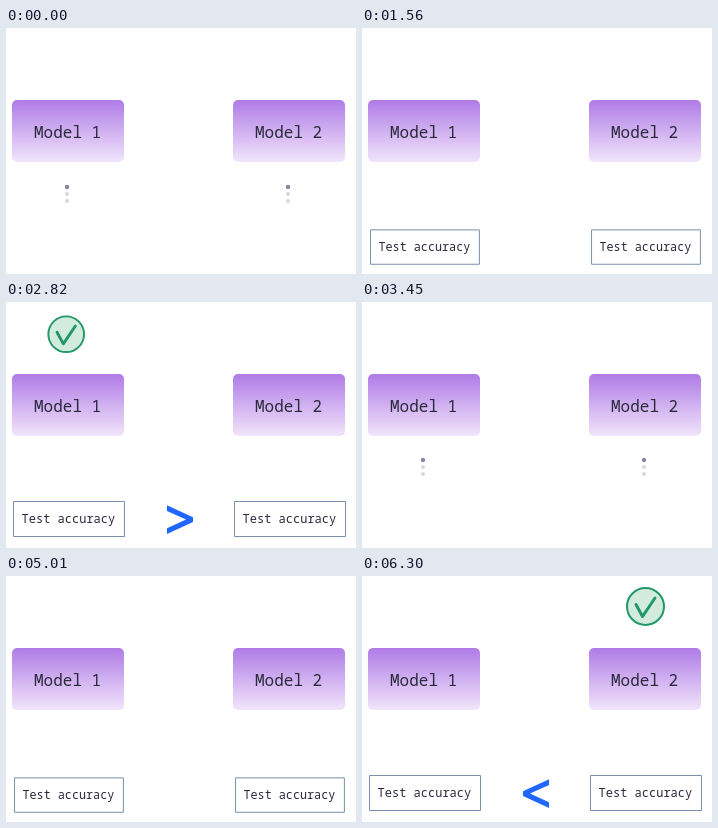
An HTML page with a canvas for the animation above (6.9 s loop, 350 by 246 pixels).

```html
<!DOCTYPE html>
<html lang="en">
<head>
<meta charset="utf-8">
<title>Model comparison</title>
<style>
html, body { margin: 0; width: 350px; height: 246px; overflow: hidden; background: #fff; }
canvas { display: block; }
</style>
</head>
<body>
<canvas id="stage" width="350" height="246"></canvas>
<script>
const ctx = document.getElementById('stage').getContext('2d');
const LOOP = 6900, HALF = LOOP / 2, STEP = 30, SPACING = 221;
const MONO = '"Noto Sans Mono", "DejaVu Sans Mono", monospace';

const fade = ctx.createLinearGradient(0, 72, 0, 134);
fade.addColorStop(0, '#b07be6');
fade.addColorStop(1, '#f1e5fb');

const clamp = x => Math.max(0, Math.min(1, x));
const lerp = (a, b, p) => a + (b - a) * p;
const progress = (t, start, end) => clamp((t - start) / (end - start));
const easeOut = p => 1 - (1 - p) ** 2;
const backOut = (p, c) => 1 + (c + 1) * (p - 1) ** 3 + c * (p - 1) ** 2;

function label(text, x, y, size, color) {
  ctx.font = `${size}px ${MONO}`;
  ctx.textAlign = 'center';
  ctx.fillStyle = color;
  ctx.fillText(text, x, y);
}

function model(n) {
  ctx.fillStyle = fade;
  ctx.beginPath();
  ctx.roundRect(6, 72, 112, 62, 5);
  ctx.fill();
  label('Model ' + n, 61.6, 109.5, 16, '#2b2a3d');
}

function dots(t, top) {
  const active = Math.floor(t / 240) % 3;
  for (let i = 0; i < 3; i++) {
    ctx.fillStyle = i === active ? '#838a9f' : '#d5d8e0';
    ctx.beginPath();
    ctx.arc(61, top + i * 7, i === active ? 2.2 : 2, 0, 7);
    ctx.fill();
  }
}

function accuracyBox(p) {
  const grow = easeOut(p);
  const w = lerp(4, 111, grow), h = lerp(4, 35, grow);
  const x = lerp(61.5, 63, grow), y = lerp(181.5, 217, backOut(p, 3.5));
  ctx.fillStyle = '#fff';
  ctx.strokeStyle = '#7890ab';
  ctx.lineWidth = 1;
  ctx.beginPath();
  ctx.rect(x - w / 2, y - h / 2, w, h);
  ctx.fill();
  ctx.stroke();
  if (w < 8) return;
  ctx.save();
  ctx.translate(x, y);
  ctx.scale(w / 111, w / 111);
  label('Test accuracy', -0.6, 4, 12, '#2b2a3d');
  ctx.restore();
}

// A "<" that flips around its tilted vertical axis; dir -1 mirrors it to ">".
function chevron(p, dir) {
  const angle = Math.PI * (1 - p * p);
  ctx.save();
  ctx.translate(174, 217.6);
  ctx.scale(dir, 1);
  ctx.transform(Math.cos(angle), 0.46 * Math.sin(angle), 0, 1, 0, 0);
  ctx.fillStyle = '#1f67ff';
  ctx.beginPath();
  for (const [x, y] of [[13, -14.4], [13, -8.6], [-6, 0], [13, 8.6], [13, 14.4], [-13, 2.4], [-13, -2.4]])
    ctx.lineTo(x, y);
  ctx.fill();
  ctx.restore();
}

function check(p, x) {
  const s = lerp(0.1, 1, easeOut(p));
  ctx.save();
  ctx.translate(x, lerp(73, 30.5, easeOut(p)));
  ctx.scale(s, s);
  ctx.strokeStyle = '#209868';
  ctx.fillStyle = '#d3ebdf';
  ctx.lineWidth = 2;
  ctx.beginPath();
  ctx.arc(0, 0, 18.5, 0, 7);
  ctx.fill();
  ctx.stroke();
  ctx.lineWidth = 3;
  ctx.lineCap = ctx.lineJoin = 'round';
  ctx.beginPath();
  ctx.moveTo(-9.5, -2);
  ctx.lineTo(-3, 10);
  ctx.lineTo(9.5, -8.5);
  ctx.stroke();
  ctx.restore();
}

function draw(now) {
  const time = Math.floor((now % LOOP) / STEP) * STEP;
  const second = time >= HALF;
  const t = time % HALF;
  const top = second ? (t < 240 ? 158 : 158.4) : (t < 480 ? 159 : 158.4);

  ctx.fillStyle = '#fff';
  ctx.fillRect(0, 0, 350, 246);
  for (const i of [0, 1]) {
    ctx.save();
    ctx.translate(i * SPACING, 0);
    model(i + 1);
    if (t < 1410) dots(t, top);
    if (t >= 1380) accuracyBox(progress(t, 1380, 1590));
    ctx.restore();
  }
  if (t >= 2100) chevron(progress(t, 2100, 2520), second ? 1 : -1);
  if (t >= 2700) check(progress(t, 2700, 2850), second ? 283.5 : 60.2);
}

const start = performance.now();
function tick() {
  draw(performance.now() - start);
  requestAnimationFrame(tick);
}
tick();
</script>
</body>
</html>
```
